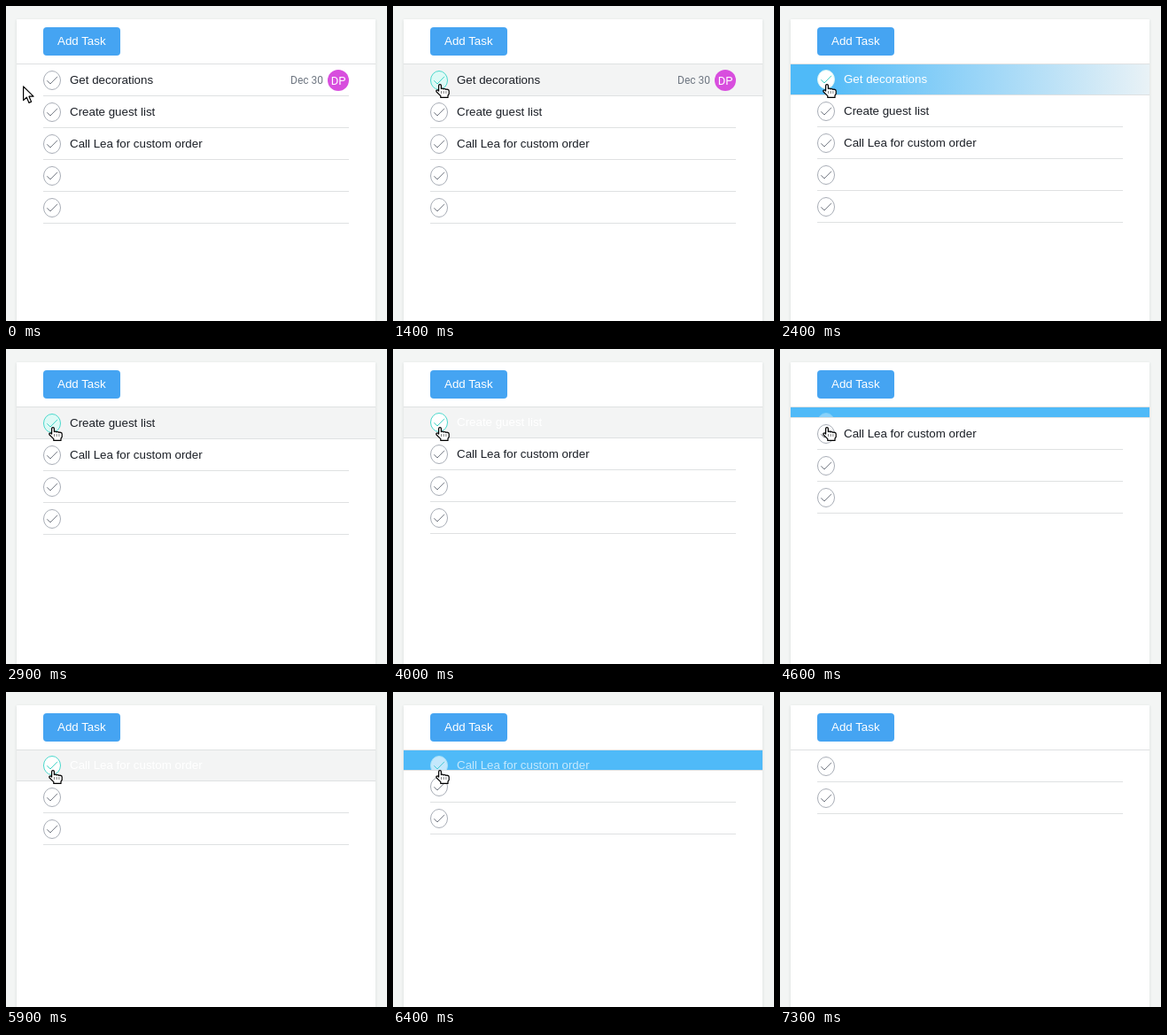
Recreate the animation shown at these times as an HTML page. Size 430 by 356 pixels, loop 8100 ms.

```html
<!DOCTYPE html>
<html lang="en">
<head>
<meta charset="utf-8">
<title>Task list</title>
<style>
html, body { margin: 0; width: 100%; height: 100%; overflow: hidden; background: #f3f5f4; }
body { position: relative; font: 13.333px "Liberation Sans", Arial, sans-serif; color: #1b1f26; }
.panel { position: absolute; left: 12px; top: 15px; bottom: 0; width: 405px; background: #fff;
  box-shadow: 0 1px 3px rgba(40, 60, 60, .15); }
.button { position: absolute; left: 30px; top: 9px; height: 32px; padding: 0 16px; border-radius: 4px;
  background: #45a4f2; color: #fff; line-height: 31px; white-space: nowrap; }
.list { position: absolute; left: 0; right: 0; top: 51px; }
.row { position: relative; overflow: hidden; }
.body { position: absolute; inset: 0; white-space: nowrap; }
.line { position: absolute; bottom: 0; height: 1px; background: #dfe1e2; }
.header { left: 0; right: 0; top: 50px; }
.label { position: absolute; left: 60px; top: 0; line-height: 35px; }
.date { position: absolute; right: 59px; top: 0; font: 12px/36px Roboto, sans-serif; color: #6f7782; }
.avatar { position: absolute; left: 351px; top: 6px; width: 24px; height: 24px; border-radius: 50%;
  background: #d84ede; color: #fff; font: 13px/25px Roboto, sans-serif; text-align: center; }
.check { position: absolute; left: 30px; top: 7px; }
.check path { fill: none; }
.cursor { position: absolute; left: 0; top: 0; fill: #fff; stroke: #000; stroke-width: 1.2;
  stroke-linejoin: round; }
.cursor .knuckles { fill: none; stroke-width: 1; stroke-dasharray: 1 1; }
</style>
</head>
<body>
<div class="panel">
  <div class="button">Add Task</div>
  <div class="line header"></div>
  <div class="list" id="list"></div>
</div>
<svg class="cursor" id="arrow" width="16" height="21">
  <path d="M.6 .8V16.6L4.3 13.2L7 19.4L9.6 18.3L7 12.2H12z"/>
</svg>
<svg class="cursor" id="hand" width="17" height="17">
  <path d="M3.6 8V2C3.6.2 6.4 .2 6.4 2V5.6C7 5 8.6 5 9 5.9C9.7 5.3 11.4 5.5 11.8 6.4C12.8 6 15.2 6.3 15.2 8V11.4L14 13.2V15.4H5.8V13.6L1.1 9C.2 7.4 1.8 6.3 3 7.3z"/>
  <path class="knuckles" d="M6.5 8.5V11M9.2 8.5V11M11.9 8.5V11"/>
</svg>
<script>
const LOOP = 8100, STEP = 100;
const LABELS = ["Get decorations", "Create guest list", "Call Lea for custom order", "", ""];

// When each task is clicked, when its sweep starts, when it is gone
const DONE = [
  { click: 2100, sweep: 2200, end: 2900 },
  { click: 4000, sweep: 4100, end: 4700 },
  { click: 5900, sweep: 5900, end: 6600 }
];

// time, x, y, shape
const CURSOR = [
  [0, 19, 90, "arrow"], [100, 17, 87, "arrow"], [200, 16, 86, "arrow"],
  [500, 30, 86, "arrow"], [600, 49, 86, "arrow"], [700, 60, 86, "arrow"],
  [1100, 54, 91, "hand"], [1200, 50, 92, "hand"], [1300, 48, 90, "hand"], [1400, 48, 88, "hand"],
  [7100, 28, 85, "arrow"], [7200, 5, 85, "arrow"], [7300, 0, 0, ""]
];

const GREY = { ring: [168, 173, 182], tick: [118, 123, 133], fill: [255, 255, 255] };
const TEAL = { ring: [74, 216, 204], tick: [66, 212, 198], fill: [222, 250, 246] };
const HOVER = "#f3f4f4";

const clamp = v => Math.max(0, Math.min(1, v));
const mix = (key, k) =>
  `rgb(${GREY[key].map((v, i) => Math.round(v + (TEAL[key][i] - v) * k))})`;

function makeRow(label, index) {
  const el = document.createElement("div");
  const extra = '<div class="extra"><span class="date">Dec 30</span><span class="avatar">DP</span></div>';
  el.className = "row";
  el.innerHTML = `<div class="body">
    <svg class="check" width="20" height="22">
      <ellipse cx="10" cy="11" rx="9.5" ry="10.5"/><path d="M4.3 11.3L8 15L16 6.8"/>
    </svg>
    <span class="label">${label}</span>${index === 0 ? extra : ""}
  </div><div class="line"></div>`;
  document.getElementById("list").append(el);
  const find = selector => el.querySelector(selector);
  return { el, body: find(".body"), line: find(".line"), label: find(".label"),
    ring: find("ellipse"), tick: find("path"), extra: find(".extra") };
}

const rows = LABELS.map(makeRow);

function paint(row, look) {
  row.el.style.height = look.height + "px";
  row.el.style.background = look.back;
  row.line.style.left = row.line.style.right = look.inset + "px";
  row.body.style.top = look.shift + "px";
  row.body.style.opacity = look.opacity;
  row.label.style.color = look.text;
  row.ring.style.fill = look.fill;
  row.ring.style.stroke = look.ring;
  row.tick.style.stroke = look.tick;
  if (row.extra) row.extra.hidden = look.done;
}

function doneLook(t, { sweep, end }) {
  const n = (t - sweep) / STEP, left = clamp((end - t) / 300);
  const from = 30 + (n - 2) * 330;
  return {
    done: true, height: Math.round(35 * left), inset: 0, shift: -1, opacity: left, text: "#fff",
    back: n > 0 ? `linear-gradient(to right, #4fbaf8 ${from}px, #eff4f6 ${from + 390}px)` : HOVER,
    fill: "#fff", ring: n > 0 ? "#d5f5f4" : mix("ring", 1), tick: mix("tick", 1)
  };
}

function openLook(hovered, glow) {
  return {
    done: false, height: 36, inset: hovered ? 0 : 30, shift: 0, opacity: 1, text: "",
    back: hovered ? HOVER : "none",
    fill: mix("fill", glow), ring: mix("ring", glow), tick: mix("tick", glow)
  };
}

function drawCursor(t) {
  const [, x, y, shape] = CURSOR.filter(c => c[0] <= t).pop();
  for (const id of ["arrow", "hand"]) {
    const { style } = document.getElementById(id);
    style.transform = `translate(${x}px, ${y}px)`;
    style.visibility = id === shape ? "visible" : "hidden";
  }
}

function draw(time) {
  const t = Math.floor(time % LOOP / STEP) * STEP;
  const inside = t >= 100 && t < 7200;
  const glow = t < 7100 ? clamp((t - 1000) / 400) : t < 7200 ? 0.5 : 0;
  let first = true;
  rows.forEach((row, i) => {
    const done = DONE[i];
    const gone = done && t >= done.end;
    row.el.hidden = gone;
    if (gone) return;
    paint(row, done && t >= done.click
      ? doneLook(t, done)
      : openLook(first && inside, first ? glow : 0));
    first = false;
  });
  drawCursor(t);
}

const begin = performance.now();
function tick() {
  draw(performance.now() - begin);
  requestAnimationFrame(tick);
}
tick();
</script>
</body>
</html>
```
